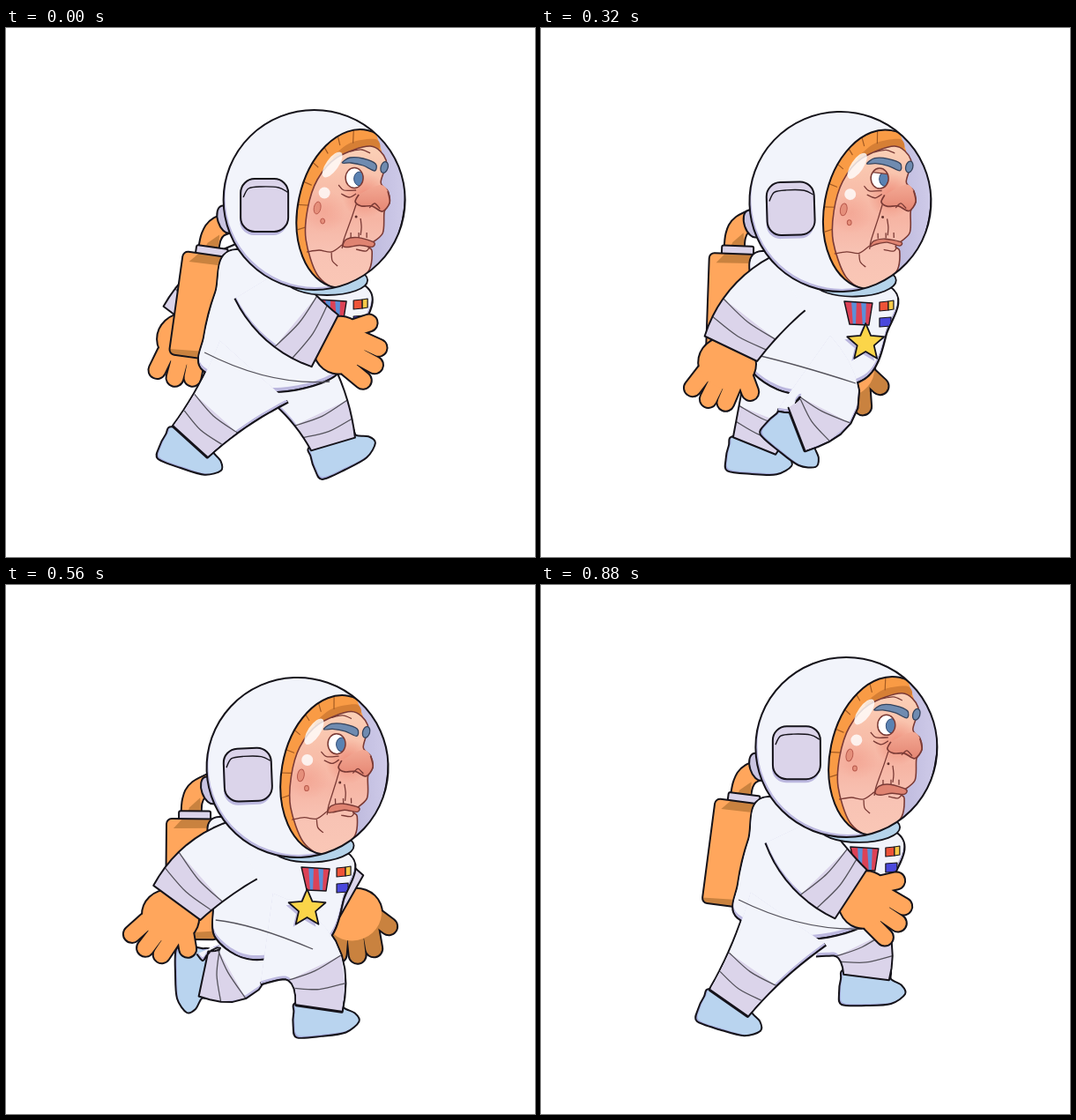
An HTML page with a canvas for the animation above (0.96 s loop, 600 px wide and 600 px high).

```html
<!DOCTYPE html>
<html lang="en">
<head>
<meta charset="utf-8">
<title>Walking astronaut</title>
<style>
html, body { margin: 0; width: 100%; height: 100%; overflow: hidden; background: #fff; }
canvas { display: block; width: 600px; height: 600px; }
</style>
</head>
<body>
<canvas id="stage" width="600" height="600"></canvas>
<script>
const g = document.getElementById('stage').getContext('2d');
const STEP = 80, STEPS = 12, TAU = Math.PI * 2, RAD = Math.PI / 180;
const INK = '#15131a', SUIT = '#f2f4fb', SHADE = '#bcb8df', BAND = '#dbd4ea', SEAM = '#55535c';
const ORANGE = '#ffa65c', RUST = '#c9823f', BOOT = '#b9d4ef', BOOTSHADE = '#a3aadb';
const LINE = '#7a3a35', BROW = '#6f8bb0';

// Head height over one stride; both strides share it
const BOB = [0, 12, 27, 20, 2, -11];

// Ankle keys: step, x, y, foot tilt, knee bend
const NEAR = [[0, 209, 469, 20, 0], [2, 222, 443, 90, 15], [4, 290, 455, 40, 30], [5, 352, 454, -12, 15],
  [7, 355, 480, -5, 25], [8, 313, 485, 0, 0], [11, 213, 474, 18, 0]];
const FAR = [[0, 371, 472, -25, 5], [2, 352, 477, 3, 5], [4, 242, 474, 5, 0], [5, 202, 466, 20, 0],
  [7, 224, 441, 90, 25], [8, 256, 440, 55, 5], [11, 369, 445, 0, 20]];

const wave = (i, shift = 0) => Math.cos(TAU * (i - shift) / STEPS);
const swing = i => Math.tanh(1.6 * (wave(i, .2) - .2));

function ankle(keys, i) {
  const n = keys.findIndex(k => k[0] >= i), b = keys[n];
  if (b[0] === i) return b.slice(1);
  const a = keys[n - 1], t = (i - a[0]) / (b[0] - a[0]);
  return b.slice(1).map((v, k) => a[k + 1] + (v - a[k + 1]) * t);
}

// Smooth path through a flat list of points
function curve(p, closed) {
  const n = p.length / 2, path = new Path2D();
  const pt = k => {
    k = closed ? (k + n) % n : Math.max(0, Math.min(n - 1, k));
    return [p[2 * k], p[2 * k + 1]];
  };
  path.moveTo(p[0], p[1]);
  for (let k = 0; k < (closed ? n : n - 1); k++) {
    const [a, b, c, d] = [pt(k - 1), pt(k), pt(k + 1), pt(k + 2)];
    path.bezierCurveTo(b[0] + (c[0] - a[0]) / 6.5, b[1] + (c[1] - a[1]) / 6.5,
      c[0] - (d[0] - b[0]) / 6.5, c[1] - (d[1] - b[1]) / 6.5, c[0], c[1]);
  }
  if (closed) path.closePath();
  return path;
}

function polygon(p) {
  const path = new Path2D();
  for (let k = 0; k < p.length; k += 2) path.lineTo(p[k], p[k + 1]);
  path.closePath();
  return path;
}

function ellipse(x, y, rx, ry, turn = 0) {
  const path = new Path2D();
  path.ellipse(x, y, rx, ry, turn, 0, TAU);
  return path;
}

function box(x, y, w, h, r) {
  const path = new Path2D();
  path.roundRect(x, y, w, h, r);
  return path;
}

function ink(path, color = INK, width = 2) {
  g.strokeStyle = color;
  g.lineWidth = width;
  g.stroke(path);
}

function paint(path, fill, color, width) {
  g.fillStyle = fill;
  g.fill(path);
  if (color) ink(path, color, width);
}

function within(path, draw) {
  g.save();
  g.clip(path);
  draw();
  g.restore();
}

// Fill with a thin shadow along the lower edge
function shaded(path, fill, shade, dx = 0, dy = -4) {
  within(path, () => {
    paint(path, shade);
    g.translate(dx, dy);
    paint(path, fill);
  });
}

const mark = (...p) => ink(curve(p), LINE, 1.3);

// Tapered limb bent through a middle joint
function tube([ax, ay], [mx, my], [bx, by], radii) {
  const N = 10, back = [], front = [];
  const bez = (a, m, b, t) => (1 - t) ** 2 * a + 2 * t * (1 - t) * (2 * m - (a + b) / 2) + t * t * b;
  const slope = (a, m, b, t) => 2 * (1 - t) * (2 * m - (a + b) / 2 - a) + 2 * t * (b - 2 * m + (a + b) / 2);
  let ux, uy;
  for (let k = 0; k <= N; k++) {
    const t = k / N, x = bez(ax, mx, bx, t), y = bez(ay, my, by, t), r = bez(...radii, t);
    ux = slope(ax, mx, bx, t);
    uy = slope(ay, my, by, t);
    const len = Math.hypot(ux, uy);
    ux /= len;
    uy /= len;
    back.push([x - uy * r, y + ux * r]);
    front.push([x + uy * r, y - ux * r]);
  }
  const path = new Path2D();
  for (const p of [...back, ...front.reverse()]) path.lineTo(...p);
  front.reverse();
  return { path, back, front, ux, uy };
}

function bands({ path, back, front, ux, uy }) {
  within(path, () => {
    paint(polygon([back[6], back[8], back[10], front[10], front[8], front[6]].flat()), BAND);
    for (const k of [6, 8]) {
      const [a, b] = [back[k], front[k]];
      ink(curve([...a, (a[0] + b[0]) / 2 + ux * 4, (a[1] + b[1]) / 2 + uy * 4, ...b]), SEAM, 1.3);
    }
  });
}

function drawBoot(x, y, tilt) {
  g.save();
  g.translate(x, y);
  g.rotate(tilt * RAD);
  const boot = curve([-24, -9, -29, 2, -31, 18, -28, 31, 0, 32, 28, 30, 44, 19, 40, 9, 28, 2, 24, -9], true);
  shaded(boot, BOOT, BOOTSHADE, 2, -2);
  ink(boot);
  g.restore();
}

function leg(keys, i, hip, thigh) {
  const [x, y, tilt, bend] = ankle(keys, i);
  const dx = x - hip[0], dy = y - hip[1], len = Math.hypot(dx, dy);
  const knee = [hip[0] + dx / 2 + dy / len * bend, hip[1] + dy / 2 - dx / len * bend];
  drawBoot(x, y, tilt);
  return tube(hip, knee, [x, y], [thigh, 35, 26]);
}

function drawHand(x, y, turn, tips) {
  g.save();
  g.translate(x, y);
  g.rotate(-turn * RAD);
  g.lineCap = 'round';
  const finger = (x0, y0, x1, y1, color, grow) => ink(polygon([x0, y0, x1, y1]), color, 18 + grow);
  for (const grow of [4, 0]) {
    const palm = grow ? INK : ORANGE, end = grow ? INK : tips;
    for (let k = 0; k < 3; k++)
      finger(-24 + 18 * k, 32, -34 + 20 * k, 52 + 13.5 * k - 4.5 * k * k, end, grow);
    finger(20, 26, 31, 44, end, grow);
    paint(ellipse(-1, 17, 32 + grow / 2, 29 + grow / 2), palm);
  }
  g.restore();
}

function arm([sx, sy], angle, length, turn, tips = ORANGE) {
  const dx = Math.sin(angle * RAD) * length, dy = Math.cos(angle * RAD) * length;
  const wrist = [sx + dx, sy + dy];
  const elbow = [sx + dx / 2 - dy * .07, sy + dy / 2 + dx * .07];
  const sleeve = tube([sx, sy], elbow, wrist, [36, 38, 33]);
  drawHand(...wrist, turn, tips);
  shaded(sleeve.path, SUIT, Math.abs(angle) === angle ? SHADE : SUIT);
  bands(sleeve);
  ink(sleeve.path);
}

function drawPack(lean) {
  const h = 128 - 10 * lean;
  g.save();
  g.translate(202, 253);
  g.rotate((4 + 4 * lean) * RAD);
  const hose = curve([28, 0, 29, -20, 36, -33, 62, -46]);
  ink(hose, INK, 25);
  ink(hose, ORANGE, 21);
  paint(polygon([26, -13, 38, -24, 39, -8, 24, -8]), RUST);
  paint(box(14, -9, 36, 14, 2), BAND, INK, 2);
  const tank = box(0, 0, 60, h, 6);
  paint(tank, ORANGE);
  within(tank, () => {
    paint(polygon([8, 11, 18, 0, 64, 0, 64, 10]), RUST);
    paint(polygon([0, h - 6, 62, h - 10, 62, h, 0, h]), RUST);
  });
  ink(tank);
  g.restore();
}

function drawMedals(sx) {
  const ribbon = polygon([355, 308, 387, 310, 383, 335, 361, 334]);
  paint(ribbon, '#dc4256');
  within(ribbon, () => {
    for (const x of [363, 374]) paint(polygon([x, 306, x + 6, 306, x + 5, 337, x + 2, 337]), '#5b8fd8');
  });
  ink(ribbon, INK, 1.4);
  const tag = (x, y, w, fill) => paint(polygon([x, y, x + w, y - 1, x + w, y + 9, x, y + 10]), fill, INK, 1.2);
  tag(395, 309, 10, '#ee5338');
  tag(405, 308, 6, '#f7c948');
  tag(395, 327, 13, '#4a48dc');
  const star = [];
  for (let k = 0; k < 10; k++) {
    const r = k % 2 ? 10 : 22, a = (k * 36 - 90) * RAD;
    star.push(sx + r * Math.cos(a), 355 + r * Math.sin(a));
  }
  paint(polygon(star.map((v, k) => v + (k % 2 ? 3 : -3))), SHADE);
  paint(polygon(star), '#fbd549', INK, 1.8);
}

function fade(x0, y0, x1, y1, ...colors) {
  const s = g.createLinearGradient(x0, y0, x1, y1);
  colors.forEach((c, k) => s.addColorStop(k / (colors.length - 1), c));
  return s;
}

function glow(x, y, r, rgb, alpha) {
  const s = g.createRadialGradient(x, y, 0, x, y, r);
  s.addColorStop(0, `rgba(${rgb},${alpha})`);
  s.addColorStop(1, `rgba(${rgb},0)`);
  paint(ellipse(x, y, r, r), s);
}

function drawFace(lid, mouth) {
  const face = curve([414, 134, 376, 147, 354, 172, 343, 205, 341, 240, 354, 280, 378, 297, 398, 289, 413, 274,
    416, 253, 412, 247, 428, 233, 430, 208, 436, 198, 434, 185, 426, 175, 432, 150], true);
  paint(face, fade(0, 138, 0, 295, '#fbcfb6', '#f8bfaa', '#f6b5a4', '#f8c3b4', '#fac7b6'), LINE, 1.6);
  within(face, () => {
    glow(408, 190, 26, '232,112,92', .6);
    glow(362, 208, 24, '238,140,122', .35);
  });
  // folds
  mark(398, 200, 393, 215, 384, 240, 382, 250);
  mark(342, 254, 356, 252, 370, 254, 382, 246);
  mark(370, 255, 371, 264, 377, 270);
  mark(403, 216, 404, 226, 403, 235);
  mark(391, 140, 404, 138, 414, 142);
  mark(378, 178, 384, 184, 398, 184);
  mark(381, 188, 390, 192, 398, 188);
  // eye
  const eye = ellipse(396, 170, 10, 11.5);
  paint(eye, '#fff');
  within(eye, () => {
    paint(ellipse(402, 171, 6.5, 8), '#5a82b2', '#35507a', 1);
    paint(polygon([380, 150, 412, 150, 412, 157 + lid * 20, 380, 152 + lid * 20]), '#eeb09b', LINE, 1.3);
  });
  ink(eye, LINE, 1.5);
  paint(curve([382, 153, 391, 147, 406, 148, 420, 154, 419, 162, 406, 156, 392, 153], true), BROW, '#35435c', 1.3);
  paint(ellipse(430, 158, 4, 6.5, .3), BROW, '#35435c', 1.3);
  // nose
  const nose = [425, 178, 434, 185, 436, 198, 428, 208, 416, 202, 404, 202, 397, 197, 401, 189];
  paint(curve(nose, true), fade(0, 176, 0, 208, '#f4ab96', '#e58673'));
  ink(curve(nose.slice(2)), LINE, 1.7);
  mark(413, 204, 419, 199, 425, 205);
  paint(ellipse(398, 214, 1.5, 1.5), '#63302c');
  // mouth
  const m = mouth * 5;
  paint(curve([383, 247, 387, 241 - m * .3, 400, 239 - m * .3, 418, 243, 416, 247 + m * .3, 402, 242 + m, 389, 244 + m], true), '#df8371', LINE, 1.4);
  for (const x of [392, 401, 410]) mark(x, 232, x, 238);
  mark(398, 251, 409, 253, 413, 249);
  // spots
  paint(ellipse(354, 204, 3.8, 7, .2), '#e58f7b', '#b8594c', 1);
  paint(ellipse(360, 219, 2.4, 3), '#e58f7b', '#b8594c', 1);
}

function drawHead(lean, lid, mouth) {
  g.save();
  g.translate(350, 195);
  g.rotate(-1.2 * (1 - lean) * RAD);
  g.translate(-350, -195);
  paint(ellipse(365, 286, 46, 17), '#b5d3ea', INK, 1.8);
  paint(ellipse(250, 217, 9, 16, -.3), '#c9c4e2', INK, 2);
  const shell = ellipse(350.5, 195, 103, 102);
  const visor = ellipse(392, 205, 60, 91, 12 * RAD);
  shaded(shell, SUIT, SHADE, 2, -3);
  within(shell, () => {
    within(visor, () => {
      paint(visor, fade(400, 0, 454, 0, '#b9b5da', '#cfcbe9'));
      paint(polygon([320, 105, 416, 105, 427, 140, 385, 180, 355, 300, 320, 300]), '#f99b45');
      paint(curve([372, 146, 392, 130, 420, 126, 424, 137, 400, 139, 380, 150], true), '#d67f35');
      // padding seams
      for (let a = 165; a < 275; a += 18) {
        const x = Math.cos(a * RAD), y = Math.sin(a * RAD);
        ink(polygon([392 + 62 * x, 205 + 91 * y, 392 + 48 * x, 205 + 75 * y]), '#a35a22', 1.2);
      }
      drawFace(lid, mouth);
      paint(ellipse(371, 155, 7, 17, .62), 'rgba(255,255,255,.8)');
      paint(ellipse(362, 187, 6.5, 6.5), 'rgba(255,255,255,.8)');
    });
    ink(visor);
  });
  ink(shell);
  paint(box(266, 176, 54, 59, 16), SHADE);
  paint(box(267, 171, 54, 60, 16), BAND, INK, 2);
  ink(curve([270, 192, 276, 182, 290, 180, 310, 181, 320, 186]), INK, 1.4);
  g.restore();
}

function draw(i) {
  const lean = wave(i), sway = 10 * wave(i, .8) - 10, bob = BOB[i % 6];
  const near = swing(i), far = swing((i + 6) % STEPS);
  const inBody = paintBody => {
    g.save();
    g.translate(sway, bob);
    paintBody();
    g.restore();
  };
  const hip = x => [x + sway, 389 + bob];
  g.clearRect(0, 0, 600, 600);
  g.lineJoin = 'round';

  inBody(() => {
    // on the back swing the pack hides the far arm
    if (far > 0 || i < 2) arm([314 + 30 * far, 275], 55 * far, 100, 12 + 12 * far, far > 0 ? RUST : ORANGE);
  });
  const farLeg = leg(FAR, i, hip(300 + 27 * lean), 44);
  shaded(farLeg.path, SUIT, SHADE);
  bands(farLeg);
  ink(farLeg.path);
  inBody(() => drawPack(lean));

  // torso and near leg share one outline
  const torso = curve([262, 252, 247 - 8 * lean, 300, 242 - 16 * lean, 350, 243 - 18 * lean, 388, 300, 412,
    376 - 4 * lean, 395, 402, 345, 406, 292], true);
  const nearLeg = leg(NEAR, i, hip(300 - 18 * lean), 52);
  inBody(() => ink(torso, INK, 4));
  ink(nearLeg.path, INK, 4);
  inBody(() => shaded(torso, SUIT, SHADE));
  shaded(nearLeg.path, SUIT, SHADE, 0, -3);
  bands(nearLeg);
  const [a, b] = [nearLeg.back[10], nearLeg.front[10]];
  ink(polygon([...a, ...b]));

  inBody(() => {
    const belt = new Path2D();
    belt.moveTo(243 - 17 * lean, 368);
    belt.quadraticCurveTo(300, 388 + 18 * lean, 368, 401);
    ink(belt, SEAM, 1.3);
    within(torso, () => drawMedals(368 + 13 * Math.sin(TAU * i / STEPS)));
    arm([291, 288], 55 * near, 98, 30 + 55 * near);
    drawHead(lean, .55 * Math.max(0, wave(i, 3)), .65 - .5 * wave(i, 4));
  });
}

function loop(now) {
  draw(Math.floor(now / STEP) % STEPS);
  requestAnimationFrame(loop);
}
draw(0);
requestAnimationFrame(loop);
</script>
</body>
</html>
```
